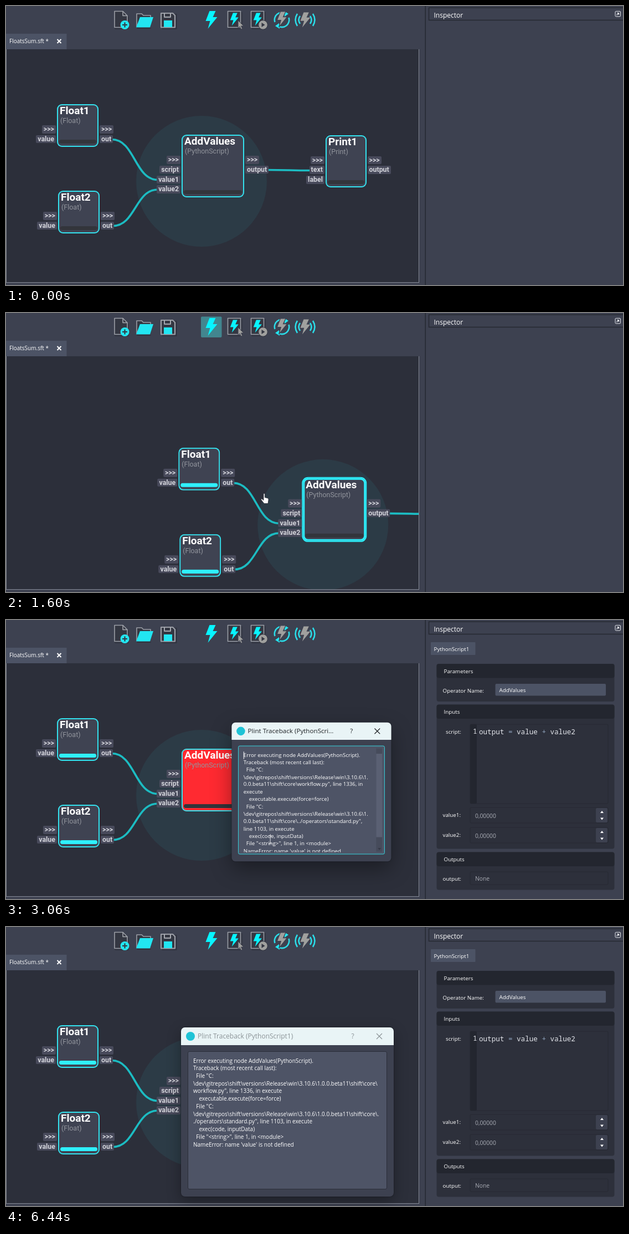
These frames come from a looping animation (1114x503 px, 6.5 s). An HTML page:

```html
<!DOCTYPE html>
<html lang="en">
<head>
<meta charset="utf-8">
<title>Node editor</title>
<style>
html, body { margin: 0; width: 100%; height: 100%; overflow: hidden; background: #3d4150; }
#stage { position: relative; width: 1114px; height: 503px; overflow: hidden; font: 10px "Open Sans", "Noto Sans", sans-serif; }
#stage > svg, #view, #dialog, #graph, #graph > *, .bar, .ports { position: absolute; }
#ui { left: 0; top: 0; }
#ui text { fill: #fff; font-size: 9.8px; }
#ui .dim { fill: #a9acb5; font-size: 10.3px; }
#ui .code { font: 12.6px "Noto Sans Mono", "DejaVu Sans Mono", monospace; fill: #e2e4ea; }
.line { fill: none; stroke: #a4a7ae; stroke-width: 2; stroke-linejoin: round; }
.page { fill: #343742; stroke: #9b9ea6; stroke-width: 1.6; stroke-linejoin: round; }
.cyan { fill: #22e6f2; }
.bright { fill: #08f4ff; }
.grey { fill: #a0a09e; }
.arc { fill: none; stroke: #2bdce8; stroke-width: 2.6; }
.dark { fill: #23262f; }
.body { fill: #2d303b; }
.field { fill: #2d303b; stroke: #262932; }
.light { fill: #4c5365; }
.step { fill: #3d4150; }

#view { left: 0; top: 78px; width: 746px; height: 421px; box-sizing: border-box; overflow: hidden; background: #2c2f3a; border: solid #868b98; border-width: 0 1px 1px; }
#graph { left: -1px; top: -78px; width: 1114px; height: 503px; }
#mark { left: 235px; top: 198px; width: 236px; height: 236px; border-radius: 50%; background: #2c3b46; }
#graph svg { left: 0; top: 0; overflow: visible; fill: none; stroke: #1cbcc2; stroke-width: 3.6; }
.node { border-radius: 9px; background: #3f4352; box-shadow: inset 0 0 0 2px #33e2ee; font-family: Roboto, sans-serif; }
.node.busy { box-shadow: inset 0 0 0 3px #2cf0fc, 0 0 0 2px #2cf0fc; }
.node.failed { background: #ff2a31; }
.node.failed.hover { background: #ff4148; }
.node b { position: absolute; left: 5px; top: 0; font-size: 19px; line-height: 23px; color: #fff; }
.node i { position: absolute; left: 6px; top: 22px; font: 12.5px/16px Roboto, sans-serif; color: #92959d; }
.bar { left: 4px; right: 4px; bottom: 6px; height: 7px; border-radius: 4px; background: #33353b; }
.done .bar { background: #2ff0fc; }
.ports { top: 38px; display: flex; flex-direction: column; gap: 3.2px; }
.ports.in { right: calc(100% + 2px); align-items: flex-end; }
.ports.out { left: calc(100% + 2px); align-items: flex-start; }
.ports span { padding: 0 3px; height: 14.6px; border-radius: 2px; background: #484a5b; color: #d2d3da; font: bold 12.4px/14.6px Roboto, sans-serif; }

#dialog { border-radius: 7px; overflow: visible; background: #3d4150; box-shadow: 0 14px 38px rgba(0,0,0,.38), 0 0 2px rgba(0,0,0,.5); }
#dialog > *, #text > * { position: absolute; }
#head { left: 0; right: 0; top: 0; height: 31.5px; border-radius: 7px 7px 0 0; background: #e9f4f6; }
#head > * { position: absolute; line-height: 31px; font-size: 12px; color: #1d2024; white-space: nowrap; }
#logo { left: 9px; top: 8px; width: 16px; height: 16px; border-radius: 50%; background: #1fc3d6; }
#name { left: 30px; right: 104px; overflow: hidden; text-overflow: ellipsis; }
#help { right: 70px; width: 8px; text-align: center; }
#close { right: 20px; top: 10px; fill: none; stroke: #1d2024; }
#text { left: 12px; right: 12px; top: 43px; bottom: 13px; box-sizing: border-box; border: 1px solid #35d8e2; border-radius: 3px; background: #4e5466; }
#clip { inset: 3px; overflow: hidden; }
#clip pre { position: absolute; margin: 0; left: 6px; top: 6.5px; font: 10px/13.73px "Open Sans", "Noto Sans", sans-serif; color: #fff; }
#caret { left: 9px; top: 10px; width: 1px; height: 14px; background: #fff; }
#scroll { right: 4px; top: 4px; bottom: 4px; width: 11px; background: #464b5b; }
#scroll::before { content: ""; position: absolute; left: 0; right: 0; top: 10px; bottom: 27px; background: #5a6073; }
#scroll::after { content: ""; position: absolute; left: 2.5px; bottom: 3px; border: solid transparent; border-width: 4px 3px 0; border-top-color: #353946; }
#dialog.idle { box-shadow: 0 8px 26px rgba(0,0,0,.32), 0 0 2px rgba(0,0,0,.5); }
.idle #text { border-color: #2b2e39; }
.idle #head * { color: #8b9397; }
.idle #close { stroke: #8b9397; }
#pointer { left: 0; top: 0; overflow: visible; }
</style>
</head>
<body>
<div id="stage">
  <svg id="ui" width="1114" height="503">
    <defs>
      <path id="bolt" d="M-3-16H8L3-5H11L-6 16-2 2H-10Z"/>
      <path id="arrow" d="M0 0V14L3.2 11 5.4 16 7.8 15 5.6 10H10Z"/>
    </defs>
    <rect y="50" width="109.500" height="28" class="light"/>
    <text x="6" y="67" style="font-size:10px">FloatsSum.sft *</text>
    <path d="M92.500 60l7 7m0-7l-7 7" stroke="#fff" stroke-width="2"/>

    <g transform="translate(1.500 2)" opacity=".45" fill="none" stroke="#20232c" stroke-width="2">
      <path d="M196 10h15l8 8v21h-23zM236 14v24h24M281 13h25v26h-25zM401 10h23v29h-23zM443 10h23v29h-23z"/>
    </g>
    <path class="page" d="M196 9.500h15l8 8V38.500h-23z"/>
    <path class="line" d="M211 9.500v8h8" style="stroke-width:1.500"/>
    <circle class="cyan" cx="214.500" cy="34" r="8"/>
    <path d="M210 34h9m-4.500-4.500v9" stroke="#343742" stroke-width="2.200"/>

    <path class="page" d="M236 37V14h9l3 3h13v6"/>
    <path class="cyan" d="M235 38.500L242 20H266L260 38.500Z"/>

    <path class="page" d="M280 13h21l4 4v21.500h-25z" style="stroke-width:2.200"/>
    <path class="line" d="M286 13v7h11v-7"/>
    <path class="cyan" d="M285 26h15v12h-15z"/>

    <rect id="hot" x="352" y="6.500" width="37.500" height="37.500" rx="2" fill="#42868f"/>
    <use href="#bolt" class="bright" x="370.500" y="25"/>

    <path class="page" d="M400.500 9.500h23v29h-23z"/>
    <use href="#bolt" class="bright" transform="translate(412 24) scale(.72)"/>
    <use href="#arrow" class="grey" transform="translate(419 26)" stroke="#3d4150"/>

    <path class="page" d="M442.500 9.500h23v29h-23z"/>
    <use href="#bolt" class="bright" transform="translate(454 24) scale(.72)"/>
    <circle class="grey" cx="464" cy="34" r="8.300" stroke="#343742"/>
    <path d="M461.500 30v8l6-4z" fill="#343742"/>

    <path class="arc" d="M485.500 29A13 13 0 0 1 505 14M510.500 21A13 13 0 0 1 491 36"/>
    <path class="cyan" d="M502 9l8 5-7 5zM494 41l-8-5 7-5z"/>
    <use href="#bolt" class="grey" transform="translate(498 24) scale(.88)" stroke="#3d4150" stroke-width="1.500"/>

    <use href="#bolt" class="grey" transform="translate(540 25) scale(.85)"/>
    <path class="arc" d="M531 18q-5 7 0 14M526 14q-7 11 0 22M549 18q5 7 0 14M554 14q7 11 0 22"/>

    <rect x="756.500" width="1.500" height="503" fill="#252831"/>
    <path d="M1114 3H763.500V25.500H1114" fill="none" stroke="#252831" stroke-width="1.500"/>
    <text x="772.500" y="21" style="font-size:12px">Inspector</text>
    <rect x="1100" y="9.500" width="9.500" height="9.500" rx="1.500" fill="none" stroke="#e8eaf0"/>
    <path d="M1102.500 16.500l4-4m-3.500 0h3.500v3.500" fill="none" stroke="#e8eaf0" stroke-width="1.200"/>
    <g id="panel"></g>
  </svg>

  <div id="view"><div id="graph">
    <div id="mark"></div>
    <svg width="746" height="503"><path id="wires"/></svg>
  </div></div>

  <div id="dialog">
    <div id="head">
      <div id="logo"></div><div id="name">Plint Traceback (PythonScript1)</div><div id="help">?</div>
      <svg id="close" width="12" height="12"><path d="M1 1l10 10m0-10L1 11" stroke-width="1.200"/></svg>
    </div>
    <div id="text"><div id="clip"><pre id="log"></pre></div><div id="scroll"></div><div id="caret"></div></div>
  </div>

  <svg id="pointer" width="1" height="1">
    <circle id="press" r="13"/>
    <use id="arrowCur" href="#arrow" fill="#e4e4e6" stroke="#30323a" stroke-width=".9"/>
    <path id="handCur" d="M5 1.500c0-1.600 2.400-1.600 2.400 0V7.500l5 1.300q2 .6 1.700 3L13 18.500H6L.8 11.800c-.8-1.500.8-2.300 1.900-1.200L5 12.500Z" fill="#fff" stroke="#22252e" stroke-width=".8"/>
    <path id="textCur" d="M-2.500-7H2.500M0-7V7M-2.500 7H2.500" fill="none" stroke="#dfe1e6"/>
    <path id="sizeCur" d="M-5 5L5-5M1-5.500H5.500V-1M-1 5.500H-5.500V1" fill="none" stroke="#fff" stroke-width="1.200"/>
  </svg>
</div>

<script>
const LOOP = 6500, STEP = 66.4;
const $ = id => document.getElementById(id);

// Inspector
const rect = (x, y, w, h, cls, r = 2) => `<rect x="${x}" y="${y}" width="${w}" height="${h}" rx="${r}" class="${cls}"/>`;
const label = (x, y, text, cls = "") => `<text x="${x}" y="${y}" class="${cls}">${text}</text>`;
const section = (y, h, title) =>
  rect(777.5, y, 321, h, "body", 4) + rect(777.5, y, 321, 25.5, "dark", 4) + label(790.5, y + 16.5, title);
const spin = (y, name) =>
  label(788.5, y + 17, name) + rect(838, y, 249, 28, "field") + rect(1065, y + 1, 21, 26, "step") +
  label(847, y + 18.5, "0,00000", "dim") +
  `<path d="M1073 ${y + 10}h6l-3-4zM1073 ${y + 18.5}h6l-3 4z" fill="#fff"/>`;
$("panel").innerHTML =
  rect(767, 40, 80.5, 23, "light", 1) + label(772.5, 55.5, "PythonScript1") +
  section(79, 68, "Parameters") + label(788.5, 130.5, "Operator Name:") +
  rect(883.5, 115, 199.5, 21.5, "light") + label(890.5, 130, "AddValues") +
  section(152.5, 260, "Inputs") + label(794, 205, "script:") +
  rect(838, 188, 249, 143, "field") + rect(838, 188, 12, 143, "dark") +
  label(843, 205, "1", "code") +
  label(854, 206, 'output <tspan fill="#8fa3bd">=</tspan> value <tspan fill="#8fa3bd">+</tspan> value2', "code") +
  spin(338, "value1:") + spin(374, "value2:") +
  section(418.5, 68, "Outputs") + label(788.5, 470, "output:") +
  rect(838, 454, 249, 23, "field") + label(847, 470, "None", "dim");

// Graph
const ports = (side, list) => `<div class="ports ${side}">${list.map(p => `<span>${p}</span>`).join("")}</div>`;
function node(x, y, w, h, name, type, ins, outs) {
  const el = document.createElement("div");
  el.className = "node";
  el.style.cssText = `left:${x}px;top:${y}px;width:${w}px;height:${h}px`;
  el.innerHTML = `<b>${name}</b><i>(${type})</i><div class="bar"></div>` +
    ports("in", ["&gt;&gt;&gt;", ...ins]) + ports("out", ["&gt;&gt;&gt;", ...outs]);
  $("graph").append(el);
  return el;
}
const float1 = node(92, 177, 75, 76.5, "Float1", "Float", ["value"], ["out"]);
const float2 = node(94, 333, 75, 76.5, "Float2", "Float", ["value"], ["out"]);
const add = node(317, 232, 113, 112.5, "AddValues", "PythonScript", ["script", "value1", "value2"], ["output"]);
node(577, 232.5, 73.5, 94.5, "Print1", "Print", ["text", "label"], ["output"]);

const wire = (x1, y1, x2, y2) => {
  const mid = (x1 + x2) / 2;
  return `M${x1} ${y1}C${mid} ${y1} ${mid} ${y2} ${x2} ${y2}`;
};
$("wires").setAttribute("d", wire(191, 240.5, 274, 313.5) + wire(193, 396.5, 274, 331) + wire(471, 295.5, 551, 296.5));

// Traceback, wrapped for the two window widths
const dir = "\\dev\\gitrepos\\shift\\versions\\Release\\win\\3.10.6\\1.";
const makeLog = (work, std) => [
  "Error executing node AddValues(PythonScript).",
  "Traceback (most recent call last):",
  '  File "C:', dir + work,
  "    executable.execute(force=force)",
  '  File "C:', dir + std,
  "    exec(code, inputData)",
  '  File "<string>", line 1, in <module>',
  "NameError: name 'value' is not defined"].join("\n");
const narrowLog = makeLog(
  '\n0.0.beta11\\shift\\core\\workflow.py", line 1336, in\nexecute',
  '\n0.0.beta11\\shift\\core\\../operators\\standard.py",\nline 1103, in execute');
const wideLog = makeLog(
  '0.0.beta11\\shift\\core\\\nworkflow.py", line 1336, in execute',
  '0.0.beta11\\shift\\core\\.\n./operators\\standard.py", line 1103, in execute');

// Tracks: [time, values...]
const panTrack = [[1238, 0, 0], [1403, 241, -83], [1581, 243, 73], [1802, 0, 0]];
const cursorTrack = [
  [140, 896, 158], [141, 428, -14], [405, 428, -14], [870, 365, 27], [1240, 365, 27],
  [1337, 390, 139], [1602, 460, 325], [1800, 450, 330], [1870, 450, 330], [2200, 386, 287],
  [2300, 386, 287], [2532, 392, 370], [2665, 395, 382], [2800, 395, 382], [3063, 477, 396],
  [3390, 602, 400], [3465, 602, 400], [3860, 406, 438], [4390, 406, 438], [4657, 319, 486.5],
  [4925, 319, 486.5], [5380, 1047, 392], [6050, 1047, 392], [6250, 1042, 510]];
const sizeTrack = [[4390, 403, 257.5], [4657, 316, 305]];
const openTrack = [[2798, 0, .9], [2960, .95, .95], [3063, 1, .97], [3200, 1, 1]];

function at(track, t) {
  const i = track.findIndex(k => k[0] > t);
  if (i < 1) return track.at(i).slice(1);
  const a = track[i - 1], b = track[i], p = (t - a[0]) / (b[0] - a[0]);
  return a.slice(1).map((v, j) => v + (b[j + 1] - v) * p);
}
const show = (id, on) => { $(id).style.display = on ? "" : "none"; };

function render(ms) {
  // The screen refreshes about 15 times a second
  const t = Math.floor((ms + 3) / STEP) * STEP + 9;
  const during = (a, b = LOOP) => t >= a && t < b;

  const [px, py] = at(panTrack, t);
  $("graph").style.transform = `translate(${px}px,${py}px)`;
  float2.classList.toggle("busy", during(1270, 1450));
  float2.classList.toggle("done", during(1450));
  float1.classList.toggle("busy", during(1450, 1590));
  float1.classList.toggle("done", during(1590));
  add.classList.toggle("busy", during(1590, 1800));
  add.classList.toggle("failed", during(1800));
  add.classList.toggle("hover", during(1930, 2460));
  show("hot", during(670, 1800));
  show("panel", during(2190));

  const [x, y] = at(cursorTrack, t);
  const hand = during(670, 1730), beam = during(3060, 3720), sizing = during(3720, 5050);
  $("pointer").style.transform = `translate(${x}px,${y}px)`;
  show("pointer", during(70, 140) || during(470, 6240));
  show("handCur", hand);
  show("textCur", beam);
  show("sizeCur", sizing);
  show("arrowCur", !hand && !beam && !sizing);
  const drag = during(4450, 4980);
  show("press", drag || during(2200, 2330));
  $("press").setAttribute("fill", drag ? "#a39322" : "#ea1f2a");

  const [left, height] = at(sizeTrack, t), [opacity, scale] = at(openTrack, t);
  const wide = left < 350;
  Object.assign($("dialog").style, {
    left: left + "px", top: "181px", width: 700 - left + "px", height: height + "px",
    opacity, transform: `scale(${scale})`
  });
  show("dialog", during(2860));
  $("dialog").classList.toggle("idle", during(6440));
  $("log").textContent = wide ? wideLog : narrowLog;
  show("scroll", !wide);
  show("caret", during(2860, 3520) || during(4060, 4520) || during(5050, 5580) || during(6110, 6440));
}

const start = performance.now();
function tick() {
  render((performance.now() - start) % LOOP);
  requestAnimationFrame(tick);
}
render(0);
requestAnimationFrame(tick);
</script>
</body>
</html>
```
